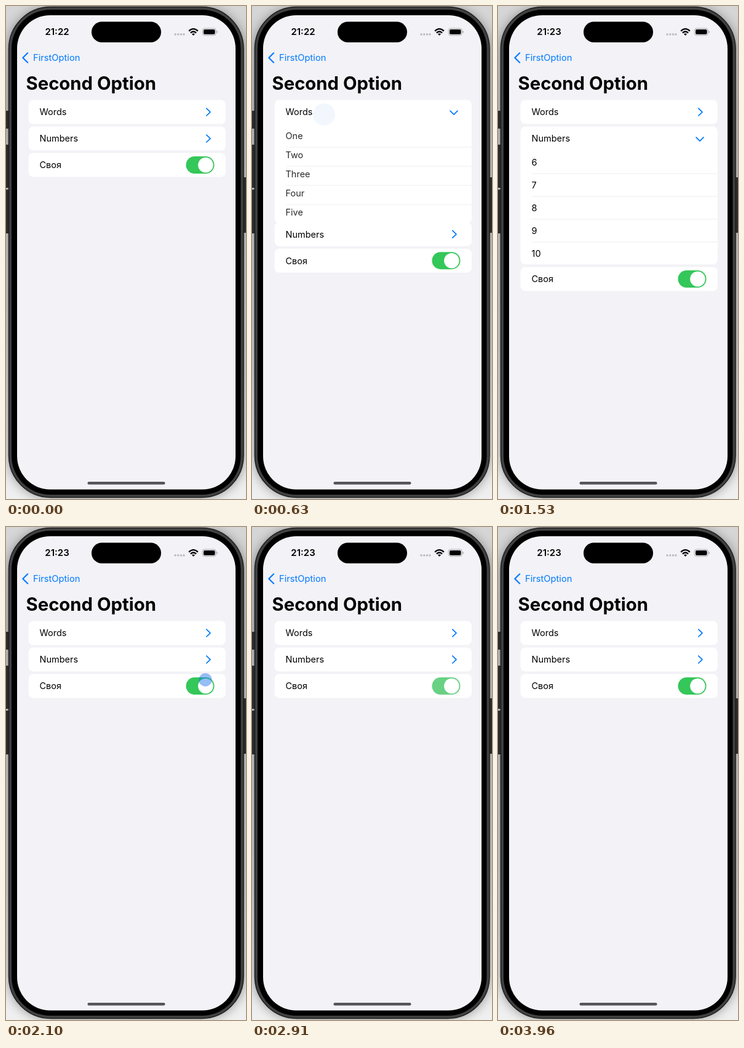
An HTML page for the animation above (3.99 s loop, 390 by 800 pixels).

```html
<!DOCTYPE html>
<html lang="en">
<head>
<meta charset="utf-8">
<style>
  html, body { margin: 0; width: 100%; height: 100%; overflow: hidden; background: #d5d5d5; }
  svg { display: block; width: 390px; height: 800px; }
  text { font: 14.5px Inter, "Open Sans", sans-serif; fill: #000; }
  .blue { fill: #007aff; }
  .line { fill: none; stroke: #007aff; stroke-linecap: round; stroke-linejoin: round; }
</style>
</head>
<body>
<svg id="stage" viewBox="0 0 390 800">
  <defs>
    <linearGradient id="wall" x2="0" y2="1">
      <stop offset="0" stop-color="#d6d6d6"/>
      <stop offset=".2" stop-color="#cacaca"/>
      <stop offset=".7" stop-color="#d8d8d8"/>
      <stop offset="1" stop-color="#f0f0f0"/>
    </linearGradient>
    <filter id="blur" x="-10%" y="-10%" width="120%" height="120%">
      <feGaussianBlur stdDeviation="9"/>
    </filter>
  </defs>
  <rect width="390" height="800" fill="url(#wall)"/>
  <rect x="4.5" y="3" width="381.5" height="795" rx="68" opacity=".4" filter="url(#blur)"/>

  <g fill="#2b2b2b">
    <rect x="-2" y="170" width="8" height="29"/>
    <rect x="-2" y="225" width="8" height="70"/>
    <rect x="-2" y="298" width="8" height="71"/>
    <rect x="385" y="278" width="8" height="90"/>
  </g>
  <rect x="4.5" y="1.5" width="381.5" height="796" rx="68" fill="#414141" stroke="#1d1d1d" stroke-width="1.5"/>
  <rect x="9" y="6" width="372.5" height="787" rx="63"/>
  <rect x="18" y="15" width="355" height="769.5" rx="54" fill="#f2f2f7"/>

  <rect x="139" y="25.5" width="113" height="33.5" rx="16.7"/>
  <text id="clock" x="83" y="47.4" text-anchor="middle" style="font-size:15px;font-weight:600"></text>
  <g fill="#b9b9be">
    <circle cx="275" cy="46" r="1.7"/><circle cx="279.8" cy="46" r="1.7"/>
    <circle cx="284.5" cy="46" r="1.7"/><circle cx="289" cy="46" r="1.7"/>
  </g>
  <g fill="none" stroke="#000" stroke-width="2.2">
    <path d="M297.2 40.6Q304.5 33.8 311.8 40.6"/>
    <path d="M299.9 43.6Q304.5 39.4 309.1 43.6"/>
  </g>
  <path d="M302 45.5Q304.5 43.4 307 45.5L304.5 48Z"/>
  <rect x="319.3" y="36.3" width="22" height="11.4" rx="3.6" fill="none" stroke="#a5a5a9"/>
  <rect x="321" y="38" width="18.6" height="8" rx="2.2"/>
  <path d="M342.6 40v4q1.5-.6 1.5-2t-1.5-2" fill="#a5a5a9"/>

  <path class="line" d="M35.2 76.3L27.4 84L35.2 91.7" stroke-width="2.2"/>
  <text class="blue" x="44" y="89.2" style="font-size:14.7px">FirstOption</text>
  <text x="32.5" y="136" style="font-size:29.3px;font-weight:700">Second Option</text>

  <g id="list"></g>
  <rect x="132.5" y="772" width="126" height="4.4" rx="2.2" fill="#555558"/>
  <circle id="touch" fill="#1673eb"/>
</svg>
<script>
const LOOP = 3990, ROW = 37, CARD = 39, PITCH = 43, TOP = 152.5;
const OPEN_TIME = 240, TAP_TIME = 270, TAP_DELAY = 62, SWITCH_LAG = 94;

const WORDS = 0, NUMBERS = 1, SWITCH = 2;
const taps = [
  { at: 390, x: 117, y: 176, target: WORDS, on: 1 },
  { at: 820, x: 117, y: 176, target: WORDS, on: 0 },
  { at: 1200, x: 187, y: 216, target: NUMBERS, on: 1 },
  { at: 1680, x: 187, y: 216, target: NUMBERS, on: 0 },
  { at: 2080, x: 324, y: 248, target: SWITCH, on: 0 },
  { at: 2600, x: 324, y: 248, target: SWITCH, on: 1 },
  { at: 3080, x: 187, y: 216, target: NUMBERS, on: 1 },
  { at: 3560, x: 187, y: 216, target: NUMBERS, on: 0 }
];

const $ = id => document.getElementById(id);
const clamp = v => Math.max(0, Math.min(1, v));
const ease = v => v * v * (3 - 2 * v);
const mix = (a, b, v) => a + (b - a) * v;

function set(node, attrs) {
  for (const key in attrs) node.setAttribute(key, attrs[key]);
  return node;
}

function add(parent, tag, attrs, text = "") {
  const node = set(document.createElementNS("http://www.w3.org/2000/svg", tag), attrs);
  node.textContent = text;
  return parent.appendChild(node);
}

function makeSection(title, items) {
  const group = add($("list"), "g", {});
  const card = add(group, "rect", { x: 36.5, width: 320.5, rx: 8, height: CARD, fill: "#fff" });
  const rows = items.map((item, i) => {
    const row = add(group, "g", {});
    add(row, "text", { x: 54.5, y: 5.2 }, item);
    if (i < items.length - 1)
      add(row, "path", { d: "M55 18.5H357", stroke: "#e9e9ec", "stroke-width": .8 });
    return row;
  });
  add(group, "text", { x: 54.5, y: 24.9 }, title);
  const section = { group, card, rows };
  if (items.length) {
    const chevron = d => add(group, "path", { class: "line", d, "stroke-width": 1.7 });
    section.closed = chevron("M325.8 13.7L332 19.6L325.8 25.5");
    section.opened = chevron("M322 17.6L328 23.6L334 17.6");
  }
  return section;
}

const sections = [
  makeSection("Words", ["One", "Two", "Three", "Four", "Five"]),
  makeSection("Numbers", ["6", "7", "8", "9", "10"]),
  makeSection("Своя", [])
];
const track = add(sections[2].group, "rect", { x: 292.5, y: 5.5, width: 46, height: 28, rx: 14 });
const knob = add(sections[2].group, "circle", { cy: 19.5, r: 12.3, fill: "#fff" });

// Linear progress of a target towards its latest tapped state.
function stateOf(target, t, initial) {
  let state = { from: initial, to: initial, u: 1 };
  for (const tap of taps) {
    const start = tap.at + TAP_DELAY;
    if (tap.target === target && t >= start)
      state = { from: 1 - tap.on, to: tap.on, u: clamp((t - start) / OPEN_TIME) };
  }
  return state;
}

function drawSection(section, y, state) {
  const open = mix(state.from, state.to, ease(state.u));
  set(section.group, { transform: `translate(0 ${y})` });
  if (!section.rows.length) return 0;
  const step = ROW * open;
  const last = section.rows.length - 1;
  set(section.card, { height: CARD + step * last + ROW * clamp(open * 1.2) });
  section.rows.forEach((row, i) => set(row, {
    transform: `translate(0 ${58 + step * i})`,
    opacity: open
  }));
  const turned = mix(state.from, state.to, clamp(state.u * 2));
  set(section.opened, { opacity: turned });
  set(section.closed, { opacity: 1 - turned });
  return step * section.rows.length;
}

function drawSwitch(t) {
  // The knob settles before the colour does.
  const { from, to, u } = stateOf(SWITCH, t - SWITCH_LAG, 1);
  const tint = mix(from, to, ease(u));
  const slide = mix(from, to, ease(clamp(u * 1.5)));
  const channel = (off, on) => Math.round(mix(off, on, tint));
  set(track, { fill: `rgb(${channel(233, 52)},${channel(233, 199)},${channel(234, 89)})` });
  set(knob, { cx: mix(306.6, 324.4, slide) });
}

function drawTouch(t) {
  const tap = taps.find(({ at }) => t >= at && t < at + TAP_TIME);
  if (!tap) return set($("touch"), { opacity: 0 });
  const u = (t - tap.at) / TAP_TIME;
  set($("touch"), { cx: tap.x, cy: tap.y, r: 10 + 9 * u, opacity: .5 * (1 - u) });
}

function draw(t) {
  $("clock").textContent = t < 870 ? "21:22" : "21:23";
  let y = TOP;
  sections.forEach((section, i) => {
    y += PITCH + drawSection(section, y, stateOf(i, t, 0));
  });
  drawSwitch(t);
  drawTouch(t);
}

const begin = performance.now();
function tick() {
  draw((performance.now() - begin) % LOOP);
  requestAnimationFrame(tick);
}
tick();
</script>
</body>
</html>
```
